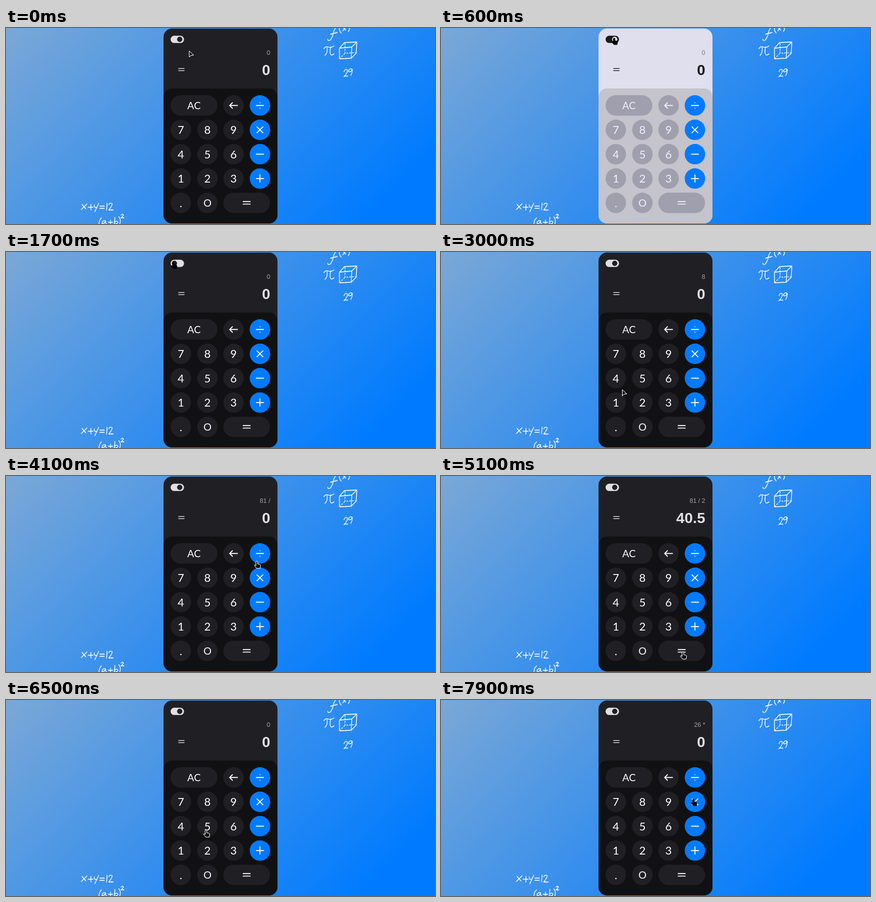
These frames come from a looping animation (768x350 px, 8 s). An HTML page:

```html
<!DOCTYPE html>
<html lang="en">
<head>
<meta charset="utf-8">
<title>Calculator</title>
<style>
  html, body { margin: 0; width: 100%; height: 100%; overflow: hidden; }
  body { background: linear-gradient(135deg, #7ba8d6, #007bff 88%); }
  svg { display: block; width: 768px; height: 350px; }
  #calc {
    --screen: #202024; --pad: #111113; --key: #202024;
    --glyph: #ffffff; --ink: #dfdfe4; --dim: #a2a2a8;
  }
  #calc.light {
    --screen: #e0dfed; --pad: #c5c3cb; --key: #a09fae;
    --glyph: #f1f0f7; --ink: #1b1b20; --dim: #77767f;
  }
  .screen { fill: var(--screen); }
  .pad { fill: var(--pad); }
  .key { fill: var(--key); }
  .key.op { fill: #007bff; }
  .ink { fill: var(--ink); }
  .label { fill: var(--glyph); font: 20px Lato, sans-serif; text-anchor: middle; }
  .icon { fill: none; stroke: var(--glyph); stroke-width: 1.7; stroke-linecap: round; stroke-linejoin: round; }
  .icon.op { stroke: #fff; }
  .equals { fill: none; stroke: var(--ink); stroke-width: 1.3; }
  .entry { fill: var(--dim); font: 11.2px "Liberation Sans", Arial, sans-serif; text-anchor: end; }
  .result { fill: var(--ink); font: bold 26.7px "Liberation Sans", Arial, sans-serif; text-anchor: end; }
  .doodles { fill: none; stroke: #fff; stroke-width: 1.3; stroke-linecap: round; stroke-linejoin: round; }
  #cursor { fill: #111; stroke: #fff; stroke-width: 1; stroke-linejoin: round; }
  #cursor.pressed { fill: #000; stroke: #000; }
</style>
</head>
<body>
<svg viewBox="0 0 768 350">
  <g class="doodles">
    <path d="M593 -2Q588 0 586 9T580 22Q577 24 576 20M581 11L593 8"/>
    <path d="M598 -3Q595 4 600 9M603 5L609 -2M602 -2L608 4M613 -4Q617 1 613 6"/>
    <path d="M569 37Q572 32 577 34T587 32M575 35Q576 44 571 49M581 34Q579 43 581 47Q583 50 587 46"/>
    <path d="M597 36L619 34L618 54L597 55ZM597 36L606 26L628 25L619 34M628 25L627 45L618 54"/>
    <path d="M607 28V45L626 44M606 46L598 54" stroke-dasharray="2 3"/>
    <path d="M605 78Q608 71 611 75Q612 80 605 87Q608 85 612 86M620 74Q615 71 613 77Q616 81 620 74Q620 80 617 85"/>
    <path d="M136 315L143 323M145 314L135 324M147 320H156M152 315V325M158 316Q158 322 163 320M166 313L159 328M168 318H176M168 322H176M181 313L180 325M184 315Q188 311 190 314Q190 318 184 325H192"/>
    <path d="M171 339Q165 345 167 352M178 344Q172 343 172 349Q177 350 178 344Q178 349 180 350M183 347H191M187 343V351M195 338L194 350Q201 350 200 346Q197 343 194 348M202 337Q207 343 203 351M206 334Q209 331 210 334Q209 337 206 339H211"/>
  </g>
  <g id="calc">
    <rect class="screen" x="282" y="1" width="204" height="348" rx="15"/>
    <rect class="pad" x="282" y="108" width="204" height="241" rx="15"/>
    <rect class="ink" x="294.7" y="13.8" width="24" height="13" rx="6.5"/>
    <circle id="knob" class="screen" cy="20.3" r="4.7"/>
    <path class="equals" d="M308.5 72.3H319.5M308.5 76.2H319.5"/>
    <text id="entry" class="entry" x="473" y="48"></text>
    <text id="result" class="result" x="473" y="84"></text>
    <g id="keys"></g>
  </g>
  <path id="cursor"/>
</svg>
<script>
const LOOP = 8000, STEP = 100;
const $ = id => document.getElementById(id);
const COLS = [313, 360.6, 407.4, 454.6];
const rowY = row => 138.3 + row * 43.5;
const R = 18.3;

const icons = {
  back: "M-7 0H7M-2 -5L-7 0L-2 5",
  divide: "M-6.5 0H6.5M0 -5V-4.8M0 4.8V5",
  times: "M-5.3 -5.3L5.3 5.3M5.3 -5.3L-5.3 5.3",
  minus: "M-6.5 0H6.5",
  plus: "M-6.5 0H6.5M0 -6.5V6.5",
  equals: "M-6.3 -2.4H6.3M-6.3 2.2H6.3"
};
const layout = [
  ["AC", null, "back", "divide"],
  ["7", "8", "9", "times"],
  ["4", "5", "6", "minus"],
  ["1", "2", "3", "plus"],
  [".", "O", "equals", null]
];
const wide = ["AC", "equals"];
const boxes = [{ x: 294.7, y: 13.8, w: 24, h: 13 }];

function add(tag, attrs, text = "") {
  const node = document.createElementNS("http://www.w3.org/2000/svg", tag);
  for (const name in attrs) node.setAttribute(name, attrs[name]);
  node.textContent = text;
  $("keys").append(node);
}

layout.forEach((row, r) => row.forEach((name, c) => {
  if (!name) return;
  const op = c === 3 ? " op" : "";
  const w = 2 * R + (wide.includes(name) ? 47 : 0);
  const box = { x: COLS[c] - R, y: rowY(r) - R, w, h: 2 * R };
  const cx = box.x + w / 2, cy = rowY(r);
  boxes.push(box);
  add("rect", { class: "key" + op, x: box.x, y: box.y, width: w, height: box.h, rx: R });
  if (icons[name]) {
    add("path", { class: "icon" + op, d: icons[name], transform: `translate(${cx} ${cy})` });
  } else {
    const small = name === "AC" || name === "O";
    add("text", { class: "label", x: cx, y: cy + (small ? 6.7 : 7.2), style: small ? "font-size:18px" : "" }, name);
  }
}));

// Pointer stops: time, x, y and whether to arrive at constant speed.
const stops = [
  [0, 328, 41], [400, 310, 18], [800, 310, 18], [1400, 300, 18],
  [1700, 300, 18], [2100, 351, 144], [2200, 351, 144], [2500, 355, 183],
  [2800, 355, 183], [3100, 314, 268], [3200, 314, 268],
  [3600, 385, 222, 1], [3800, 452, 148, 1], [4000, 452, 148],
  [4100, 449, 152], [4500, 352, 251], [4600, 352, 251], [4900, 433, 314],
  [5400, 433, 314], [5900, 340, 142], [6100, 340, 142],
  [6300, 356, 189, 1], [6500, 358, 232, 1], [6800, 362, 271, 1],
  [7000, 362, 271], [7300, 407, 222], [7400, 407, 222], [7800, 452, 177]
];
const presses = [600, 1700, 2800, 3200, 3900, 4600, 5000, 6000, 7000, 7400, 7900];
const entries = [[0, "0"], [2800, "8"], [3200, "81"], [3900, "81 /"], [4600, "81 / 2"],
  [6000, "0"], [7000, "2"], [7400, "26"], [7900, "26 *"]];
const results = [[0, "0"], [5000, "40.5"], [6000, "0"]];

const ARROW = "M0 0V11L3 8L8 7.5Z";
const HAND = "M-1.5 1.5Q-1.5 0 0 0T1.5 1.5V5L5.2 6Q7 6.5 6.7 8.5L5.7 13H-.2L-4 8.5Q-4.6 7 -3.2 6.8L-1.5 8Z";

const clamp = u => Math.max(0, Math.min(1, u));
const smooth = u => u * u * (3 - 2 * u);
const ramp = (t, from, length) => smooth(clamp((t - from) / length));
const current = (list, t) => list.findLast(([at]) => at <= t)[1];

function pointerAt(t) {
  const i = stops.findIndex(([at]) => at > t);
  if (i < 0) return stops.at(-1).slice(1, 3);
  const [t0, x0, y0] = stops[i - 1], [t1, x1, y1, steady] = stops[i];
  const u = (t - t0) / (t1 - t0), k = steady ? u : smooth(u);
  return [x0 + (x1 - x0) * k, y0 + (y1 - y0) * k];
}

function render(t) {
  $("calc").classList.toggle("light", t >= 600 && t < 1700);
  $("knob").setAttribute("cx", 311 - 9.5 * (ramp(t, 600, 300) - ramp(t, 1700, 300)));
  $("entry").textContent = current(entries, t);
  $("result").textContent = current(results, t);

  const [x, y] = pointerAt(t);
  const over = boxes.some(b => x >= b.x && x <= b.x + b.w && y >= b.y && y <= b.y + b.h);
  const pressed = presses.some(at => t >= at && t < at + STEP);
  const cursor = $("cursor");
  cursor.setAttribute("d", over ? HAND : ARROW);
  cursor.setAttribute("transform", `translate(${x} ${y}) scale(${pressed ? 0.9 : 1})`);
  cursor.classList.toggle("pressed", pressed);
}

const start = performance.now();
function tick() {
  const t = (performance.now() - start) % LOOP;
  render(Math.floor(t / STEP) * STEP);
  requestAnimationFrame(tick);
}
tick();
</script>
</body>
</html>
```
